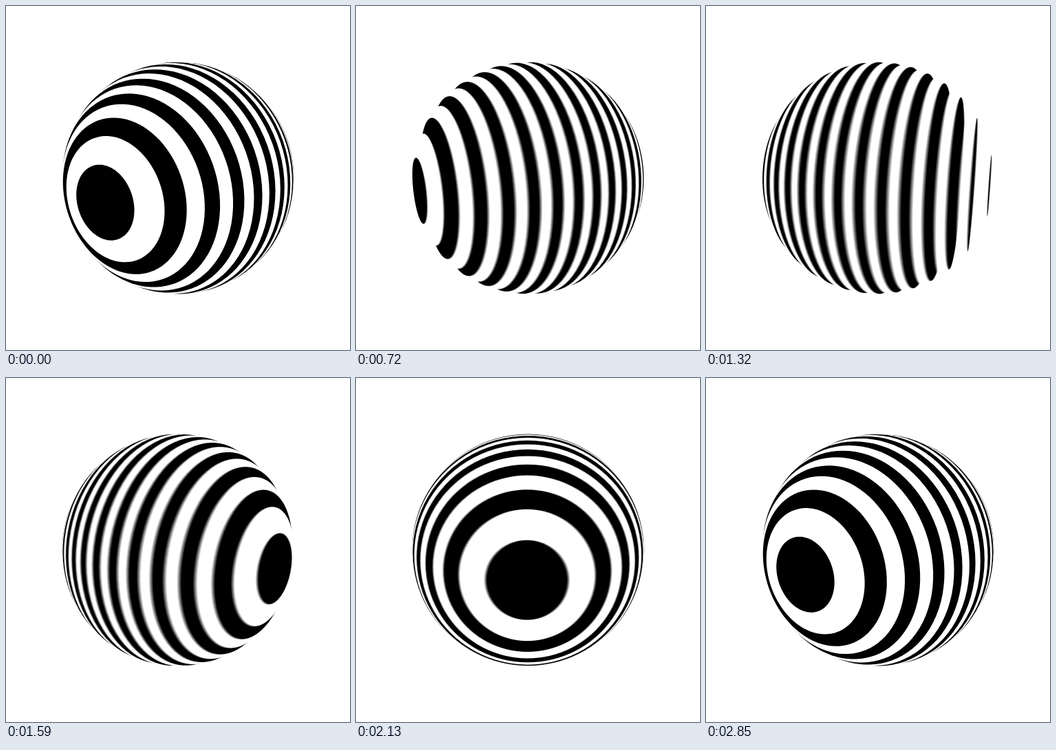
An HTML page with a canvas for the animation above (2.88 s loop, 500 by 500 pixels).

```html
<!DOCTYPE html>
<html lang="en">
<head>
<meta charset="utf-8">
<title>Striped sphere</title>
<style>
  html, body { margin: 0; width: 100%; height: 100%; overflow: hidden; background: #fff; }
  canvas { display: block; width: 500px; height: 500px; }
</style>
</head>
<body>
<canvas id="stage" width="500" height="500"></canvas>
<script>
const SIZE = 500;
const LOOP = 2880, STEP = 30, STEPS = LOOP / STEP;
const RADIUS = 157, DISCS = 31, GAP = 2 * RADIUS / DISCS;
const CAMERA = SIZE / 2 / Math.tan(Math.PI / 6);
const TILT = Math.PI / 16, START = -Math.PI / 6;
const SAMPLES = 8, SHUTTER = 0.6;
const POINTS = 96;

const stage = document.getElementById('stage').getContext('2d');
const layerCanvas = document.createElement('canvas');
layerCanvas.width = layerCanvas.height = SIZE;
const layer = layerCanvas.getContext('2d');

const ring = Array.from({ length: POINTS }, (_, i) => {
  const a = i / POINTS * 2 * Math.PI;
  return [Math.cos(a), Math.sin(a)];
});

const ease = p => p * p * (3 - 2 * p);

// Discs are stacked along the axis n; u and v span each disc's plane.
function drawSphere(p) {
  const turn = START - Math.PI * ease(p);
  const s = Math.sin(turn), c = Math.cos(turn);
  const st = Math.sin(TILT), ct = Math.cos(TILT);
  const n = [s, c * st, c * ct];
  const u = [c, -s * st, -s * ct];
  const v = [0, ct, -st];

  const eye = CAMERA * n[2];
  const discs = Array.from({ length: DISCS }, (_, i) => ({
    h: (i - (DISCS - 1) / 2) * GAP,
    color: i % 2 ? '#fff' : '#000'
  }));
  // Far planes first
  discs.sort((a, b) => Math.abs(b.h - eye) - Math.abs(a.h - eye));

  layer.fillStyle = '#fff';
  layer.fillRect(0, 0, SIZE, SIZE);
  for (const { h, color } of discs) {
    const r = Math.sqrt(RADIUS * RADIUS - h * h);
    layer.beginPath();
    for (const [a, b] of ring) {
      const [x, y, z] = n.map((m, k) => h * m + r * (a * u[k] + b * v[k]));
      const zoom = CAMERA / (CAMERA - z);
      layer.lineTo(SIZE / 2 + x * zoom, SIZE / 2 + y * zoom);
    }
    layer.closePath();
    layer.fillStyle = color;
    layer.fill();
  }
}

// Averages several moments of the open shutter for motion blur.
function render(step) {
  for (let k = 0; k < SAMPLES; k++) {
    drawSphere((step + SHUTTER * (k + 0.5) / SAMPLES) / STEPS);
    stage.globalAlpha = 1 / (k + 1);
    stage.drawImage(layerCanvas, 0, 0);
  }
}

let shown = -1;
function tick() {
  const step = Math.floor(performance.now() % LOOP / STEP);
  if (step !== shown) render(shown = step);
  requestAnimationFrame(tick);
}
tick();
</script>
</body>
</html>
```
